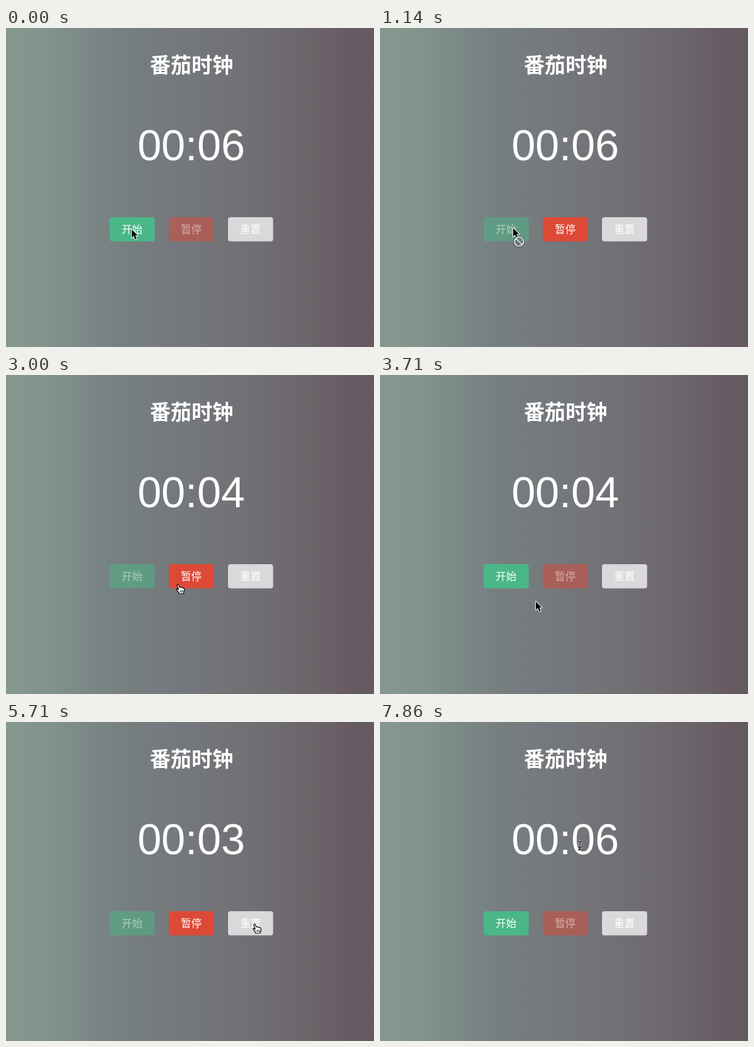
Write an HTML page with a canvas that moves like this. It is 600 px wide and 521 px high and loops after 8000 ms.

```html
<!DOCTYPE html>
<html lang="zh-CN">
<head>
<meta charset="utf-8">
<title>番茄时钟</title>
<style>
html, body { margin: 0; width: 100%; height: 100%; overflow: hidden; }
canvas { display: block; }
</style>
</head>
<body>
<canvas id="stage" width="600" height="521"></canvas>
<script>
const ctx = document.getElementById('stage').getContext('2d');
const LOOP = 8000, FPS = 7, FADE = 300;
const CJK = '"Noto Sans CJK SC", "Noto Sans CJK", sans-serif';

const backdrop = ctx.createLinearGradient(0, 0, 600, 0);
[[0, '#85988f'], [.12, '#81938c'], [.23, '#7a8786'], [.33, '#767e80'], [.5, '#74777b'],
 [.67, '#716f74'], [.83, '#6b656a'], [.93, '#685b63'], [1, '#645a61']]
  .forEach(stop => backdrop.addColorStop(...stop));

// Timer state: [start time, text]; the clock runs during RUNS
const COUNTS = [[0, '00:06'], [1285, '00:05'], [2285, '00:04'], [5700, '00:03'], [6640, '00:06']];
const RUNS = [[285, 3240], [4700, 6640]];

// Pointer: [time, x, y, shape until the next entry]
const POINTER = [
  [0, 205, 329, 'arrow'], [280, 205, 329, 'no'], [900, 217, 327, 'no'], [1290, 217, 327, 'no'],
  [1700, 228, 343, 'no'], [1850, 245, 350, 'arrow'], [2140, 272, 345, 'hand'], [2400, 280, 342, 'hand'],
  [3240, 280, 342, 'no'], [3440, 280, 342, 'no'], [3520, 272, 352, 'arrow'], [3700, 254, 370, 'arrow'],
  [4000, 254, 370, 'arrow'], [4250, 222, 347, 'hand'], [4480, 202, 330, 'hand'], [4700, 202, 330, 'no'],
  [4870, 202, 330, 'no'], [5020, 238, 350, 'arrow'], [5300, 320, 358, 'arrow'], [5500, 382, 346, 'hand'],
  [5700, 405, 330, 'hand'], [7150, 405, 330, 'hand'], [7250, 393, 302, 'arrow'], [7430, 350, 245, 'arrow'],
  [7500, 325, 217, 'beam'], [7690, 291, 201, 'beam'], [7850, 326, 202, 'beam'], [LOOP, 326, 202, 'beam']
];

const ARROW = new Path2D('M0 0V13.5L3.2 10.6 5.6 16.2 8.1 15.1 5.7 9.7H9.8Z');
const HAND = new Path2D('M4.8 16 4.6 14Q2.5 12 .9 9.3Q.6 7.9 2 8L4.3 9.8 2.2 3Q1.8 1 3.2 .9' +
  'Q4.4 .8 4.9 2.6L6 6Q6.8 5 8 5.8Q9 5.2 10 6.3Q11 5.8 12 7.2Q13.5 7 13.8 9Q14 12 13 13.5L12.6 16Z');
const FINGERS = new Path2D('M7.4 10.5V14M9.4 10.5V14M11.4 10.5V14');
const BEAM = new Path2D('M-3-7Q0-7 0-5V5Q0 7-3 7M3-7Q0-7 0-5M3 7Q0 7 0 5M-1.5 2.5H1.5');
const NO = new Path2D('M17 21.8A7.3 7.3 0 1 1 2.4 21.8A7.3 7.3 0 1 1 17 21.8M4.6 16.7 14.8 26.9');

const clamp = v => Math.min(1, Math.max(0, v));

function stroke(path, color, width) {
  ctx.strokeStyle = color;
  ctx.lineWidth = width;
  ctx.stroke(path);
}

function fill(path, color) {
  ctx.fillStyle = color;
  ctx.fill(path);
}

function text(str, x, y, font) {
  ctx.font = font;
  ctx.fillStyle = '#fff';
  ctx.fillText(str, x, y);
}

function button(x, label, color, alpha) {
  const shape = new Path2D();
  shape.roundRect(x, 309, 73.5, 39.5, 4);
  ctx.globalAlpha = alpha;
  fill(shape, color);
  text(label, x + 36.5, 335, '500 17px ' + CJK);
  ctx.globalAlpha = 1;
}

const shapes = {
  arrow() {
    stroke(ARROW, '#fff', 2);
    fill(ARROW, '#000');
  },
  no() {
    shapes.arrow();
    stroke(NO, '#4b4f50', 4);
    stroke(NO, '#e4e6e6', 2);
  },
  hand() {
    ctx.translate(-3, -1);
    fill(HAND, '#fff');
    stroke(HAND, '#000', 1.2);
    stroke(FINGERS, '#000', .9);
  },
  beam() {
    stroke(BEAM, '#ddd', 3);
    stroke(BEAM, '#111', 1.3);
  }
};

function pointer(t) {
  const i = POINTER.findLastIndex(p => p[0] <= t);
  const [t0, x0, y0, shape] = POINTER[i];
  const [t1, x1, y1] = POINTER[i + 1];
  const k = (t - t0) / (t1 - t0);
  ctx.save();
  ctx.translate(x0 + (x1 - x0) * k, y0 + (y1 - y0) * k);
  shapes[shape]();
  ctx.restore();
}

function draw(now) {
  const t = Math.floor((now % LOOP + 4) * FPS / 1000) * 1000 / FPS % LOOP;
  const running = RUNS.reduce((sum, [on, off]) =>
    sum + clamp((t - on) / FADE) - clamp((t - off) / FADE), 0);

  ctx.fillStyle = backdrop;
  ctx.fillRect(0, 0, 600, 521);
  ctx.textAlign = 'center';
  ctx.lineJoin = 'round';
  text('番茄时钟', 302.5, 72.5, 'bold 34px ' + CJK);
  text(COUNTS.findLast(c => c[0] <= t)[1], 302, 215.5, '70px "Liberation Sans", Arial, sans-serif');
  button(169, '开始', '#4ab787', 1 - running / 2);
  button(265.5, '暂停', '#dd4937', .5 + running / 2);
  button(362, '重置', '#dad8db', 1);
  pointer(t);
  requestAnimationFrame(draw);
}
requestAnimationFrame(draw);
</script>
</body>
</html>
```
